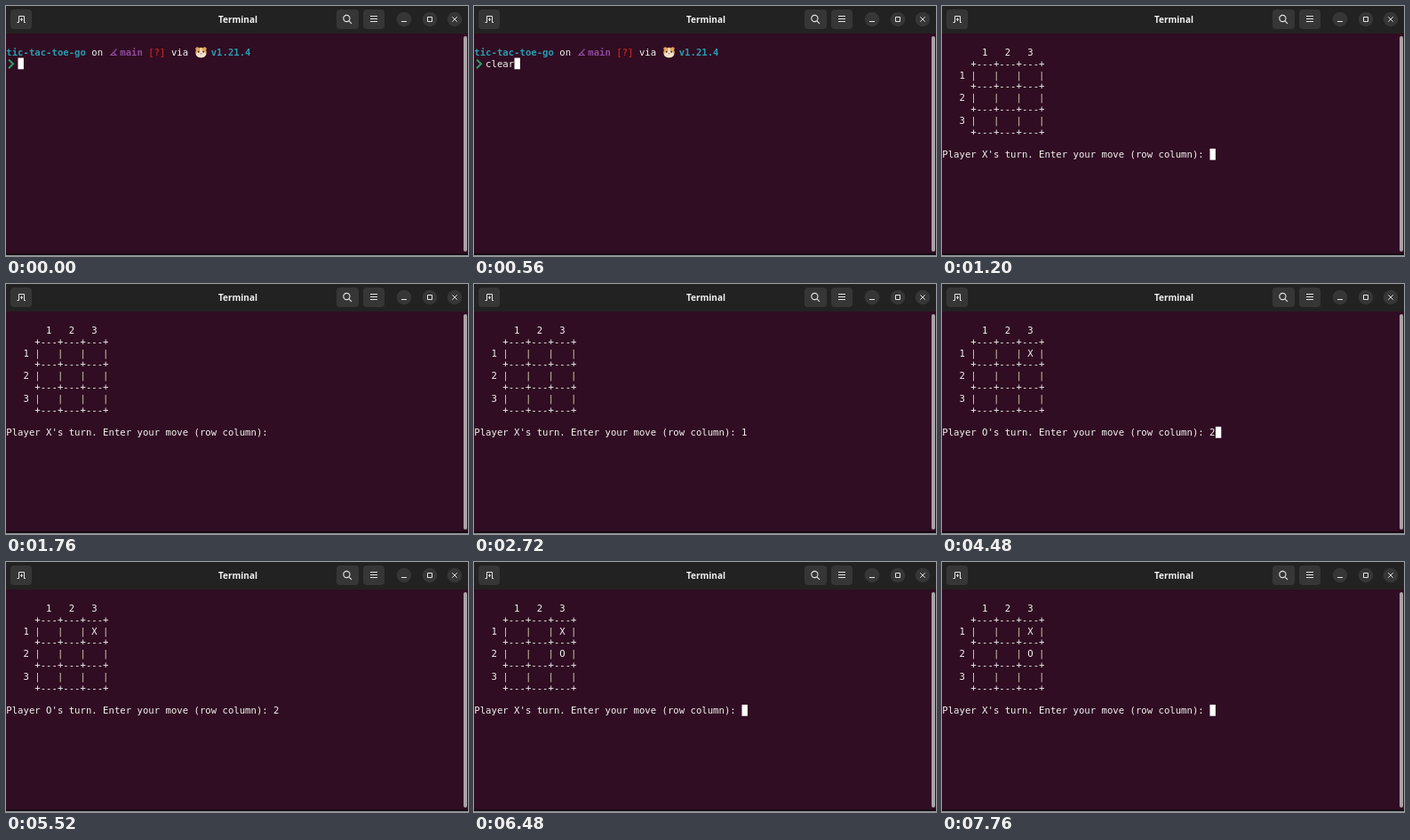
These frames come from a looping animation (520 by 282 pixels, 8000 ms). An HTML page with a canvas:

```html
<!DOCTYPE html>
<html lang="en">
<head>
<meta charset="utf-8">
<title>Terminal</title>
<style>
html, body { margin: 0; width: 100%; height: 100%; overflow: hidden; background: #300d22; }
canvas { display: block; }
</style>
</head>
<body>
<canvas id="stage"></canvas>
<script>
const W = 520, H = 282, LOOP = 8000;
const CELL = 6.4, LINE = 12.8, LEFT = 0.3, TOP = 45.7;
const MONO = '10.63px "DejaVu Sans Mono", monospace';
const WHITE = '#f4f2f3', CYAN = '#2a9bb0', PURPLE = '#8c4a9c', RED = '#b3231f', GREEN = '#26a269';

const canvas = document.getElementById('stage');
const ctx = canvas.getContext('2d');
const scale = window.devicePixelRatio || 1;
canvas.width = W * scale;
canvas.height = H * scale;
canvas.style.width = W + 'px';
canvas.style.height = H + 'px';
ctx.scale(scale, scale);

// Each step: start time, typed text, cursor shown, player to move (null = shell), marks placed
const steps = [
  [0, '', true, null],
  [80, 'c', true, null],
  [320, 'cl', true, null],
  [400, 'cle', true, null],
  [480, 'clea', true, null],
  [560, 'clear', true, null],
  [800, '', true, null],
  [1200, '', true, 'X', 0],
  [1760, '', false, 'X', 0],
  [2160, '1', true, 'X', 0],
  [2240, '1 ', true, 'X', 0],
  [2720, '1 ', false, 'X', 0],
  [2960, '1 3', true, 'X', 0],
  [3440, '1 3', false, 'X', 0],
  [3600, '', true, 'O', 1],
  [4160, '', false, 'O', 1],
  [4320, '2', true, 'O', 1],
  [4800, '2 ', true, 'O', 1],
  [5360, '2 ', false, 'O', 1],
  [5840, '2 3', true, 'O', 1],
  [6480, '', true, 'X', 2],
  [6960, '', false, 'X', 2],
  [7520, '', true, 'X', 2]
];

function box(x, y, w, h, color, radius = 0) {
  ctx.fillStyle = color;
  ctx.beginPath();
  ctx.roundRect(x, y, w, h, radius);
  ctx.fill();
}

function oval(x, y, rx, ry, color) {
  ctx.fillStyle = color;
  ctx.beginPath();
  ctx.ellipse(x, y, rx, ry, 0, 0, 7);
  ctx.fill();
}

function stroke(path, color, width = 1) {
  ctx.strokeStyle = color;
  ctx.lineWidth = width;
  ctx.stroke(new Path2D(path));
}

function print(text, col, row, color = WHITE, weight = '') {
  ctx.font = weight + ' ' + MONO;
  ctx.textAlign = 'left';
  [...text].forEach((ch, i) => {
    ctx.fillStyle = ch === '|' ? '#d9d4b4' : color;
    ctx.fillText(ch, LEFT + (col + i) * CELL, TOP + row * LINE + 10.2);
  });
}

function drawCursor(col, row) {
  box(LEFT + col * CELL + 0.4, TOP + row * LINE, CELL, LINE, '#ffffff');
}

function drawWindow() {
  box(0, 0, W, H, '#300d22');
  box(0, 0, W, 31, '#222222');
  for (const [x, w] of [[5, 24], [372, 25], [402, 24]]) box(x, 4, w, 22, '#363636', 4);
  for (const x of [448, 477, 505]) oval(x, 15, 8.3, 8.3, '#363636');

  const ink = '#e6e6e6';
  stroke('M12.5 18.5H14.5V11.5H20.5V18.5H22M17.5 13.5V17M16 15.2H19', ink);
  stroke('M387 14a3.6 3.6 0 1 1-7.2 0a3.6 3.6 0 1 1 7.2 0M386 16.8L389 19.8', ink, 1.1);
  stroke('M410 11.5H418M410 14.5H418M410 17.5H418', ink);
  stroke('M445 17.5H451M474.5 12.5H479.5V17.5H474.5ZM502.3 12.3L507.7 17.7M507.7 12.3L502.3 17.7', ink);

  ctx.font = 'bold 10px "Open Sans", "Noto Sans", sans-serif';
  ctx.textAlign = 'center';
  ctx.fillStyle = '#f2f2f2';
  ctx.fillText('Terminal', 261, 18.5);

  box(515, 34, 4, 243, '#aaa2a7', 2);
  box(0, 279, W, 2, '#160a12');
  box(0, 281, W, 1, '#8d9096');
}

function drawHamster() {
  for (const x of [215.3, 223.7]) {
    oval(x, 48.3, 2, 2, '#d9984c');
    oval(x, 48.6, 1, 1, '#e8a3a0');
  }
  oval(219.5, 52.5, 6.3, 5.8, '#e0a65c');
  oval(219.5, 54.6, 5.5, 3.6, '#f3e3cf');
  oval(219.5, 49.5, 1.2, 2.5, '#f3e3cf');
  for (const x of [216.8, 222.2]) oval(x, 51.8, 0.9, 1, '#3b2420');
  oval(219.5, 53.7, 1.1, 0.8, '#d97a80');
}

function drawShell(typed) {
  print('tic-tac-toe-go', 0, 0, CYAN, 'bold');
  print('on', 15, 0);
  stroke('M124.5 48.5L118 55.5H125M121 52.2L123.5 55', PURPLE, 1.2);
  print('main', 20, 0, PURPLE, 'bold');
  print('[?]', 25, 0, RED, 'bold');
  print('via', 29, 0);
  drawHamster();
  print('v1.21.4', 36, 0, CYAN, 'bold');
  stroke('M3 60.5L8 65.3L3 70.2', GREEN, 2);
  print(typed, 2, 1);
}

function drawGame(player, marks, typed) {
  print('1   2   3', 7, 0);
  for (let r = 0; r < 4; r++) print('+---+---+---+', 5, 1 + 2 * r);
  for (let r = 1; r < 4; r++) print(r + ' |   |   |   |', 3, 2 * r);
  if (marks > 0) print('X', 15, 2);
  if (marks > 1) print('O', 15, 4);
  print(`Player ${player}'s turn. Enter your move (row column): ${typed}`, 0, 9);
}

function render(now) {
  const t = now % LOOP;
  const [, typed, cursor, player, marks] = steps.findLast(step => step[0] <= t);
  drawWindow();
  if (player) drawGame(player, marks, typed);
  else drawShell(typed);
  if (cursor) drawCursor((player ? 47 : 2) + typed.length, player ? 9 : 1);
}

const start = performance.now();
function tick() {
  render(performance.now() - start);
  requestAnimationFrame(tick);
}
tick();
</script>
</body>
</html>
```
